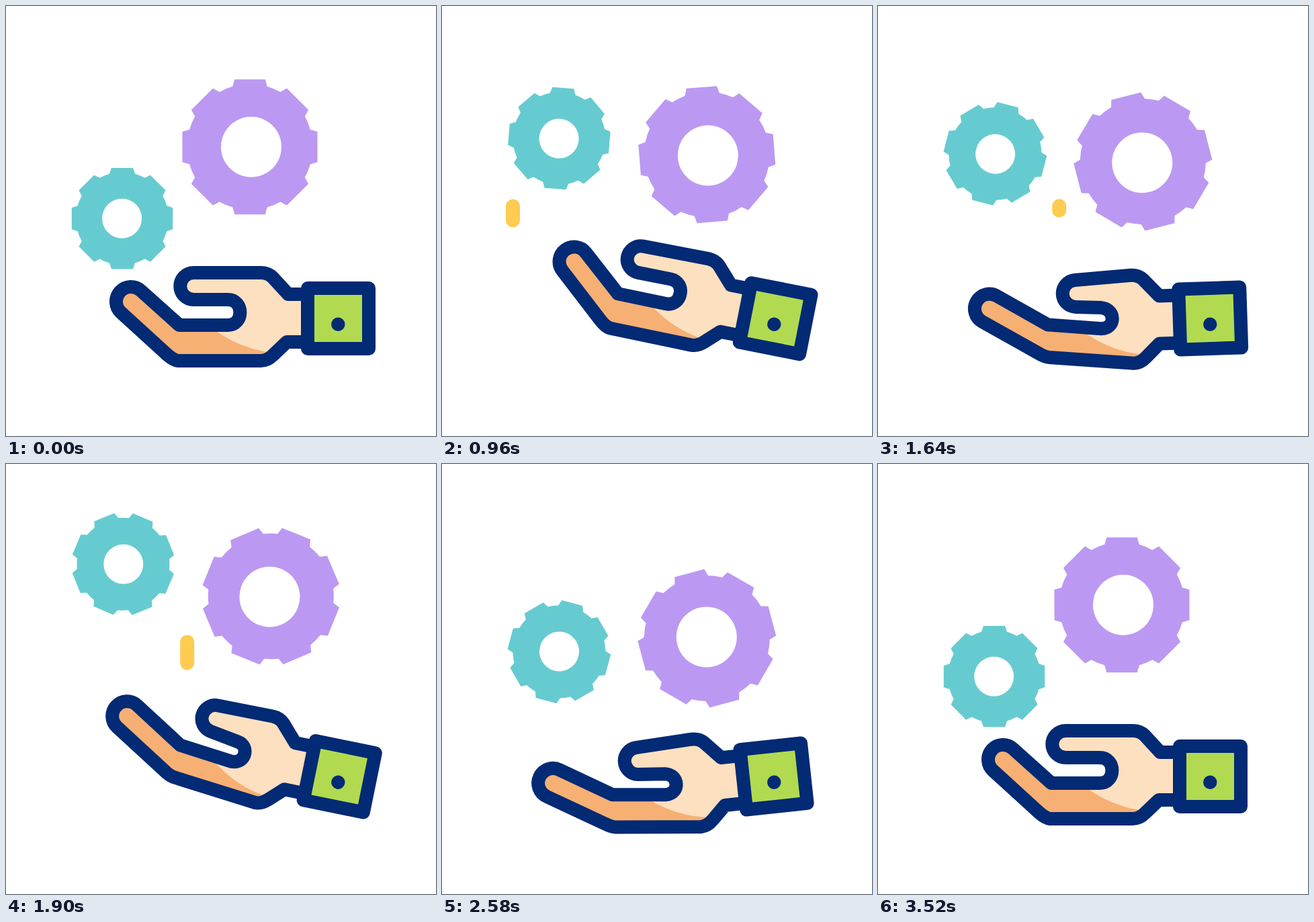
An HTML page that plays this animation: 640x640 px, repeating every 3600 ms.

```html
<!DOCTYPE html>
<html lang="en">
<head>
<meta charset="utf-8">
<title>Hand and gears</title>
<style>
  html, body { margin: 0; width: 100%; height: 100%; overflow: hidden; background: #fff; }
  svg { display: block; width: 100vw; height: 100vh; }
  .line { fill: none; stroke: #032a74; stroke-width: 20; stroke-linejoin: round; stroke-linecap: round; }
  .dash { fill: none; stroke: #ffcb50; stroke-width: 21; stroke-linecap: round; }
</style>
</head>
<body>
<svg viewBox="0 0 640 640">
  <path id="dashA" class="dash"/>
  <path id="dashB" class="dash"/>
  <path id="teal" fill="#66cbd0" fill-rule="evenodd"/>
  <path id="purple" fill="#bb99f2" fill-rule="evenodd"/>
  <g id="arm">
    <path id="skin" fill="#fce0bf"/>
    <path id="shade" fill="#f6b074"/>
    <path id="outline" class="line"/>
    <rect class="line" x="449" y="420" width="91" height="90" style="fill:#b1da51"/>
    <circle cx="494.3" cy="473.7" r="10.2" fill="#032a74"/>
  </g>
</svg>
<script>
const LOOP = 3600;
const $ = id => document.getElementById(id);
const ramp = (t, from, to) => Math.min(1, Math.max(0, (t - from) / (to - from)));
const soft = p => (1 - Math.cos(Math.PI * p)) / 2;
const point = (x, y) => `${x.toFixed(2)} ${y.toFixed(2)} `;

// Each beat swings the value softly to its next stop
const swing = (beats, stops, t) => stops.reduce((v, stop, i) =>
  i ? v + (stop - stops[i - 1]) * soft(ramp(t, beats[i - 1], beats[i])) : stop, 0);

const handBeats = [220, 840, 1450, 2000, 2620, 3040, 3440];
const gearBeats = [220, 800, 1400, 2000, 2720, 3150, 3480];
const tilt = [0, 13.1, -7.4, 13.1, -6.3, 7.6, 0];
const bend = [0, 0, 1, 1, 1, 0.47, 0];
const squeeze = [0, 0, 1, 0, 0.6, 0.6, 0];
const tealY = [316.2, 184, 262, 141, 293, 154, 316.2];
const purpleY = [209.7, 215, 252, 193, 266, 181, 209.7];

// One full turn: slow start, quicker second half, short stop
function turn(t) {
  const s = ramp(t, 220, 3500);
  return 360 * (s - s * (1 - s) * (0.92 - 1.2 * s));
}

// Eight flat teeth around a disc with a round hole
function gear(reach, half, body, hole, hx) {
  const base = 16 * Math.PI / 180, tip = Math.atan2(half, reach), far = Math.hypot(reach, half);
  const at = (r, a) => point(r * Math.sin(a), -r * Math.cos(a));
  let d = '';
  for (let i = 0; i < 8; i++) {
    const a = i * Math.PI / 4;
    d += (i ? `A${body} ${body} 0 0 1 ` : 'M') + at(body, a - base) +
      `L${at(far, a - tip)}L${at(far, a + tip)}L${at(body, a + base)}`;
  }
  d += `A${body} ${body} 0 0 1 ${at(body, -base)}Z`;
  return d + `M${hx - hole} 0a${hole} ${hole} 0 1 0 ${2 * hole} 0a${hole} ${hole} 0 1 0 ${-2 * hole} 0Z`;
}

// Round fingertip: tangent in from one point, around the circle, tangent out to another
function fingertip([x0, y0], [cx, cy], r, [x1, y1]) {
  const angle = (x, y, side) =>
    Math.atan2(y - cy, x - cx) + side * Math.acos(r / Math.hypot(x - cx, y - cy));
  const at = a => point(cx + r * Math.cos(a), cy + r * Math.sin(a));
  const a = angle(x0, y0, -1), b = angle(x1, y1, 1);
  const large = a + 2 * Math.PI - b > Math.PI ? 1 : 0;
  return `L${point(x0, y0)}L${at(a)}A${r} ${r} 0 ${large} 0 ${at(b)}L${point(x1, y1)}`;
}

function drawHand(t) {
  const b = swing(handBeats, bend, t), s = swing(handBeats, squeeze, t);
  const gapX = 330 + 7 * b - 5 * s, gapY = 437 + 7.5 * b - s;
  const palmX = 256 - 3 * b, palmY = 528 - 13 * b;
  const thumb = fingertip([379, 397], [279.3 + 17 * b, 417 + 6 * s], 20, [gapX, gapY]);
  const gap = `C354.5 ${gapY + 3 * b} 354.5 475 ${330 + 2 * b} 475`;
  const fingers = fingertip([258 - 5 * b, 475 - 8.5 * b], [186 - 19 * b, 440], 22,
    [palmX - 16, palmY - 9 + 2 * b]) +
    `Q${palmX - 7} ${palmY - 1} ${palmX} ${palmY}L379 528C386 528 391 526 397 520`;
  const hand = `M449 429L420 429L397 404C391 398 385 397 379 397${thumb}${gap}${fingers}L418 500L449 500`;
  $('skin').setAttribute('d', hand + 'Z');
  $('outline').setAttribute('d', hand);
  $('shade').setAttribute('d', `M305 478${fingers}L397 516Q345 510 305 478Z`);
  $('arm').setAttribute('transform', `rotate(${swing(handBeats, tilt, t)} 494.3 473.7)`);
}

// A dash whose upper end runs ahead and whose lower end catches up
function drawDash(id, t, x, low, start) {
  const head = low - 39 * ramp(t, start, start + 260);
  const tail = low - 39 * ramp(t, start + 180, start + 790);
  $(id).setAttribute('d', tail - head > 0.1 ? `M${x} ${head}V${tail}` : '');
}

function place(id, x, stops, t, angle) {
  $(id).setAttribute('transform', `translate(${x} ${swing(gearBeats, stops, t)}) rotate(${angle})`);
}

$('teal').setAttribute('d', gear(75.2, 16, 69, 29.5, -0.4));
$('purple').setAttribute('d', gear(100.5, 22.7, 93.5, 45, 2));

function draw() {
  const t = performance.now() % LOOP;
  const apart = soft(ramp(t, 220, 620)) - soft(ramp(t, 2920, 3460));
  place('teal', 173 + 1.4 * apart, tealY, t, -turn(t));
  place('purple', 363 + 31.3 * apart, purpleY, t, turn(t));
  drawDash('dashA', t, 105.5, 337, 495);
  drawDash('dashB', t, 269.7, 304, 1600);
  drawHand(t);
  requestAnimationFrame(draw);
}
draw();
</script>
</body>
</html>
```
